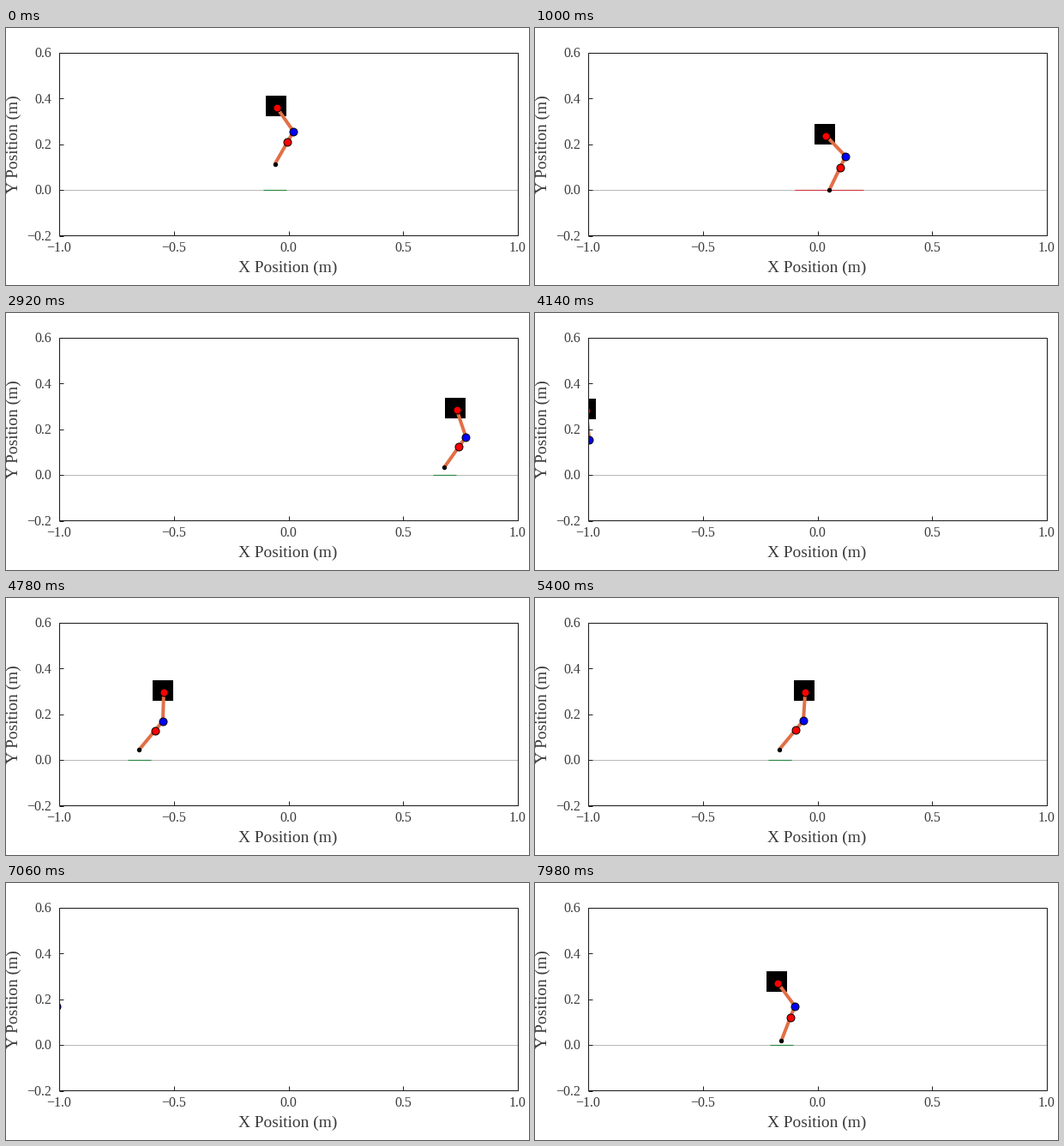
A matplotlib script for the animation above (8000 ms loop, 610x300 px).

```python
import numpy as np
import matplotlib.pyplot as plt
from matplotlib.animation import FuncAnimation
from matplotlib.patches import Rectangle

W, H, DPI = 610, 300, 100
PT = 72 / DPI
INTERVAL, FRAMES = 20, 400
LEFT, RIGHT, TOP, BOTTOM = 62, 597, 28.5, 242
SCALE = 267.5                     # pixels per metre
GROUND = 189
WRAP = 655                        # travel before the robot re-enters at the left
GRAVITY = 9.81 * SCALE / 1e6      # px / ms^2
THIGH, SHANK, ANKLE = 33.4, 43.6, 14.3
STANCE_Y = 119                    # body centre at touchdown and lift-off
STANCE_SHARE = 0.17               # part of a stride spent on the ground at each end
INK, FRAME = "#3a3a3a", "#222222"

# Key points of the accelerating body along the unwrapped track
KEY_T = np.array([0, 1000, 2060, 4140, 5400, 7060, 7980])
KEY_X = np.array([315, 338, 424.5, 713.5, 969, 1348, 1592])
KEY_V = np.gradient(KEY_X, KEY_T)


def body_x(t):
    """Cubic Hermite path through the key points."""
    i = np.clip(np.searchsorted(KEY_T, t, side="right") - 1, 0, len(KEY_T) - 2)
    dt = KEY_T[i + 1] - KEY_T[i]
    u = (t - KEY_T[i]) / dt
    return ((1 + 2 * u) * (1 - u) ** 2 * KEY_X[i] + u * u * (3 - 2 * u) * KEY_X[i + 1]
            + dt * u * (1 - u) * ((1 - u) * KEY_V[i] - u * KEY_V[i + 1]))


def foothold(t):
    """The foot lands ahead of the body when slow and trails it when fast."""
    return body_x(t) - 3.5 - 6 * np.tanh((t - 3000) / 900)


# Strides shorten steadily, then keep a constant pace
steps = [-213]
while steps[-1] < FRAMES * INTERVAL + 300:
    steps.append(steps[-1] + max(307, 457 - 17 * len(steps)))


def flight_span(i):
    margin = STANCE_SHARE * (steps[i + 1] - steps[i])
    return steps[i] + margin, steps[i + 1] - margin


def pose(t):
    """Body centre, foot position and ground contact at time t."""
    i = max(k for k in range(len(steps) - 1) if flight_span(k)[0] <= t)
    lift_off, touch_down = flight_span(i)
    flight = touch_down - lift_off
    bx = body_x(t)
    start, end = foothold(steps[i]), foothold(steps[i + 1])
    if t < touch_down:
        p = (t - lift_off) / flight
        rise = GRAVITY * flight ** 2 / 2 * p * (1 - p)
        q = p ** 1.5
        fx = start + (end - start) * q * q * (3 - 2 * q)
        return bx, STANCE_Y - rise, fx, GROUND - 1.1 * rise, False
    stance = flight_span(i + 1)[0] - touch_down
    dip = GRAVITY * flight / 2 * stance / np.pi
    by = STANCE_Y + dip * np.sin(np.pi * (t - touch_down) / stance)
    return bx, by, end, GROUND, True


def solve_knee(hip, foot):
    d = foot - hip
    r = min(np.hypot(*d), THIGH + SHANK - 0.01)
    bend = np.arccos(np.clip((THIGH ** 2 + r * r - SHANK ** 2) / (2 * THIGH * r), -1, 1))
    angle = np.arctan2(d[1], d[0]) - bend
    return hip + THIGH * np.array([np.cos(angle), np.sin(angle)])


plt.rcParams["font.family"] = "Liberation Serif"
fig = plt.figure(figsize=(W / DPI, H / DPI), dpi=DPI, facecolor="white")
ax = fig.add_axes([0, 0, 1, 1])
ax.set(xlim=(0, W), ylim=(H, 0))
ax.axis("off")


def label(x, y, text, size=16, **kw):
    ax.text(x, y, text, fontsize=size * PT, color=INK, va="baseline", **kw)


def stroke(xs, ys, color, width=1, **kw):
    return ax.plot(xs, ys, color=color, lw=width * PT, solid_capstyle="butt", **kw)[0]


def tick_text(v):
    return f"{v:.1f}".replace("-", "\u2212")


for v in (-0.2, 0.0, 0.2, 0.4, 0.6):
    y = GROUND - v * SCALE
    stroke([LEFT, LEFT + 5], [y, y], FRAME, zorder=8)
    label(53, y + 5.5, tick_text(v), ha="right")
for v in (-1.0, -0.5, 0.0, 0.5, 1.0):
    x = (LEFT + RIGHT) / 2 + v * SCALE
    stroke([x, x], [BOTTOM, BOTTOM - 5], FRAME, zorder=8)
    label(x, 261, tick_text(v), ha="center")
label(328.5, 285, "X Position (m)", 19.4, ha="center")
label(14, 136, "Y Position (m)", 19.4, ha="center", rotation=90, rotation_mode="anchor")

box = Rectangle((LEFT, TOP), RIGHT - LEFT, BOTTOM - TOP, fill=False,
                ec=FRAME, lw=PT * 1.1, zorder=9)
ax.add_patch(box)
stroke([LEFT, RIGHT], [GROUND, GROUND], "#b8b8b8", zorder=1)


def dot(color, diameter):
    return ax.plot([], [], "o", ms=diameter * PT, mfc=color, mec="black",
                   mew=PT, zorder=6)[0]


pad = stroke([], [], "green", 1.2, zorder=2)
body = ax.add_patch(Rectangle((0, 0), 24, 24, fc="black", lw=0, zorder=3))
leg = stroke([], [], "#e26f46", 4, zorder=4, solid_joinstyle="round")
joints = [dot("red", 9), dot("red", 9), dot("blue", 9), dot("black", 4.4)]
parts = [pad, body, leg, *joints]
for part in parts:
    part.set_clip_path(box)


def update(frame):
    bx, by, fx, fy, contact = pose(frame * INTERVAL)
    shift = WRAP * np.floor(bx / WRAP)
    bx, fx = bx - shift, fx - shift
    hip, foot = np.array([bx + 1.2, by + 2]), np.array([fx, fy])
    knee = solve_knee(hip, foot)
    ankle = knee + (foot - knee) * ANKLE / SHANK
    reach = 40 if contact else 13.5
    pad.set_data([fx - reach, fx + reach], [GROUND, GROUND])
    pad.set_color("#cf3a4a" if contact else "#2f8a45")
    body.set_xy((bx - 12, by - 12))
    leg.set_data(*zip(hip, knee, foot))
    for joint, (x, y) in zip(joints, (hip, ankle, knee, foot)):
        joint.set_data([x], [y])
    return parts


anim = FuncAnimation(fig, update, frames=FRAMES, interval=INTERVAL,
                     repeat=True, repeat_delay=0)
plt.show()
```
